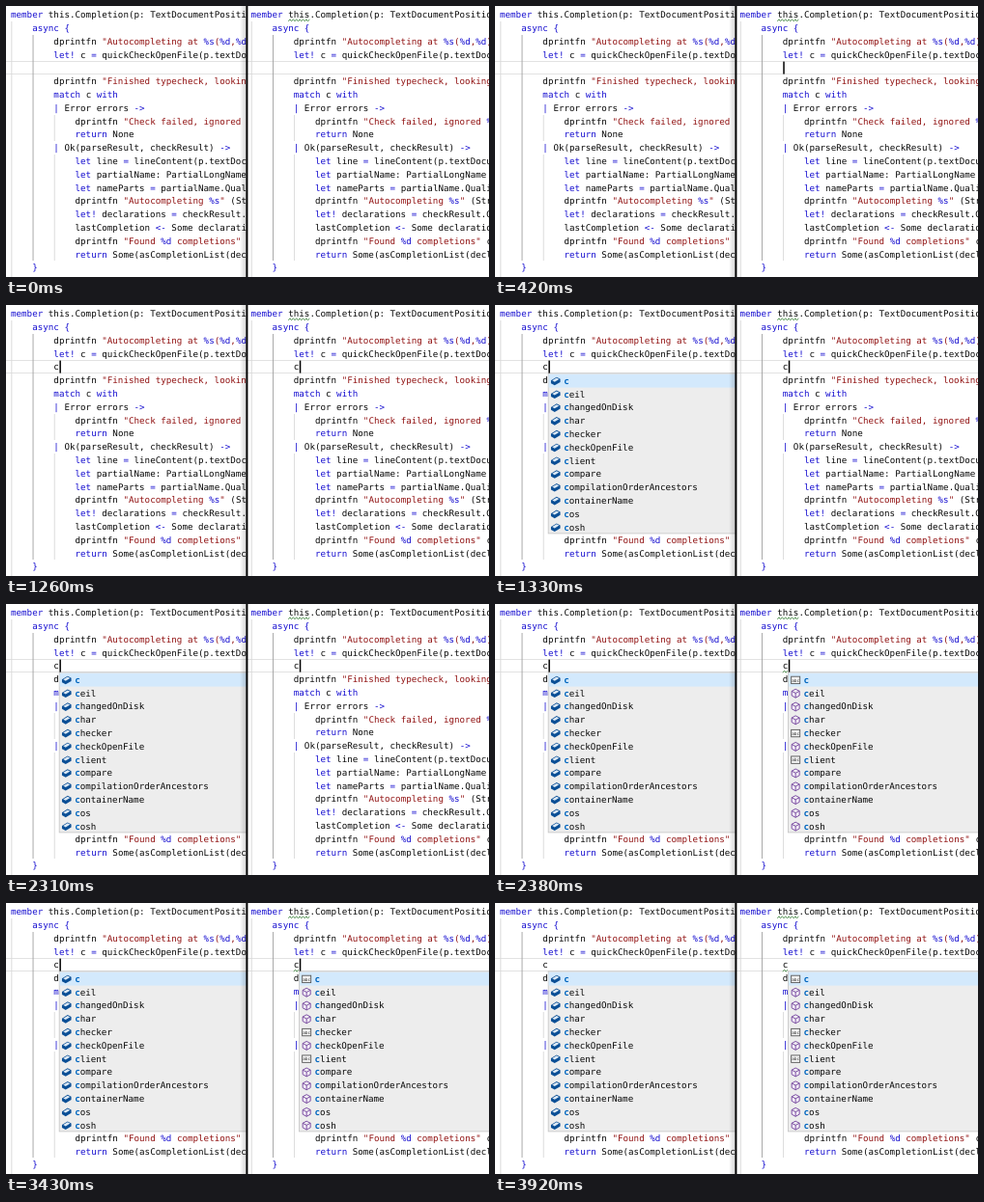
These frames come from a looping animation (500x281 px, 4.2 s). An HTML page:

```html
<!DOCTYPE html>
<html lang="en">
<head>
<meta charset="utf-8">
<title>Code completion side by side</title>
<style>
html, body { margin: 0; width: 100%; height: 100%; overflow: hidden; background: #fff; }
svg { display: block; width: 100vw; height: 100vh; }
text {
  font: 9.21px "DejaVu Sans Mono", monospace;
  white-space: pre;
  text-rendering: geometricPrecision;
}
</style>
</head>
<body>
<svg id="stage" viewBox="0 0 500 281" preserveAspectRatio="none"></svg>
<script>
const LOOP = 4200, CHAR = 5.545, LINE = 13.79, BASE = 12.3;
const BLUE = '#1810d0', RED = '#921414', INK = '#0a0a0a';

const code = [
  'member this.Completion(p: TextDocumentPositionParams) =',
  '    async {',
  '        dprintfn "Autocompleting at %s(%d,%d)" p.textDocument',
  '        let! c = quickCheckOpenFile(p.textDocument)',
  '',
  '        dprintfn "Finished typecheck, looking for completions"',
  '        match c with',
  '        | Error errors ->',
  '            dprintfn "Check failed, ignored %d errors"',
  '            return None',
  '        | Ok(parseResult, checkResult) ->',
  '            let line = lineContent(p.textDocument)',
  '            let partialName: PartialLongName = getName line',
  '            let nameParts = partialName.QualifyingIdents',
  '            dprintfn "Autocompleting %s" (String.concat)',
  '            let! declarations = checkResult.GetDeclarations',
  '            lastCompletion <- Some declarations',
  '            dprintfn "Found %d completions" count',
  '            return Some(asCompletionList(declarations))',
  '    }'
];
const items = ['c', 'ceil', 'changedOnDisk', 'char', 'checker', 'checkOpenFile', 'client',
  'compare', 'compilationOrderAncestors', 'containerName', 'cos', 'cosh'];
const plainWords = ['c', 'checker', 'client'];

const stage = document.getElementById('stage');

function add(parent, tag, attrs, content) {
  const node = document.createElementNS('http://www.w3.org/2000/svg', tag);
  for (const key in attrs) node.setAttribute(key, attrs[key]);
  if (content) node.textContent = content;
  parent.appendChild(node);
  return node;
}

function rect(parent, x, y, width, height, fill) {
  return add(parent, 'rect', { x, y, width, height, fill });
}

function clip(id, x, width) {
  rect(add(stage, 'clipPath', { id }), x, 0, width, 281, '#000');
}

function paintLine(parent, source, x, y) {
  const tokens = /"[^"]*"|\blet!|\b(?:member|async|let|match|with|return)\b|->|<-|[{}|=]|[^\s"]+?(?=[\s"{}|=.]|$)|\.|\s+/g;
  const isKey = /^(?:let!?|member|async|match|with|return|->|<-|[{}|=])$/;
  const put = (str, at, fill) => add(parent, 'text', { x: x + at * CHAR, y, fill }, str);
  for (const m of source.matchAll(tokens)) {
    const word = m[0];
    if (!word.trim()) continue;
    if (word[0] === '"') {
      for (const part of word.matchAll(/%[sd]|[^%]+/g))
        put(part[0], m.index + part.index, part[0][0] === '%' ? BLUE : RED);
    } else put(word, m.index, isKey.test(word) ? BLUE : INK);
  }
}

function squiggle(parent, x, y, width) {
  let d = `M${x} ${y}`;
  for (let i = 1; i * 1.7 <= width; i++) d += `L${x + i * 1.7} ${y + (i % 2 ? -1.6 : 0)}`;
  return add(parent, 'path', { d, fill: 'none', stroke: '#2c7a2c', 'stroke-width': 0.9 });
}

function brick(parent, x, y) {
  const g = add(parent, 'g', { transform: `translate(${x} ${y})` });
  add(g, 'path', { d: 'M-4.8 -.6L1 -4.2L4.8 -2.2V1L-1 4.4L-4.8 2.3Z', fill: '#0b4f96' });
  add(g, 'path', { d: 'M-3.5 -.6L1 -3.3L3.6 -2L-1 .8Z', fill: '#dce9f5' });
}

function cube(parent, x, y) {
  add(parent, 'path', {
    transform: `translate(${x} ${y})`,
    d: 'M0 -4.4L4 -2.3V2.3L0 4.5L-4 2.3V-2.3ZM-4 -2.3L0 -.2L4 -2.3M0 -.2V4.5',
    fill: '#f4edf8', stroke: '#70409a', 'stroke-width': 0.9, 'stroke-linejoin': 'round'
  });
}

function wordBox(parent, x, y) {
  add(parent, 'rect', { x: x - 4.5, y: y - 3.7, width: 9, height: 7.4,
    fill: '#f5f5f5', stroke: '#555', 'stroke-width': 0.9 });
  add(parent, 'text', { x, y: y + 1.7, fill: '#333', 'text-anchor': 'middle',
    style: 'font-size:4.4px' }, 'abc');
}

function popup(parent, x, mixed) {
  const g = add(parent, 'g', {});
  add(g, 'rect', { x: x + 0.4, y: 70.9, width: 220, height: 166,
    fill: '#ededed', stroke: '#c4c4c4', 'stroke-width': 0.8 });
  rect(g, x + 0.8, 71.8, 220, 13.8, '#d3e9fc');
  items.forEach((item, i) => {
    const y = 78.9 + i * LINE;
    const icon = !mixed ? brick : plainWords.includes(item) ? wordBox : cube;
    icon(g, x + 8, y);
    const left = x + 16.4, base = y + 3;
    add(g, 'text', { x: left, y: base, fill: '#0066bf', style: 'font-weight:bold' }, 'c');
    add(g, 'text', { x: left + CHAR, y: base, fill: INK }, item.slice(1));
  });
  return g;
}

function editor(id, x, mixed) {
  const g = add(stage, 'g', { 'clip-path': `url(#${id})` });
  for (const y of [57, 70]) rect(g, x - 5, y, 260, 1, '#e2e2e2');
  const guide = (col, from, to, fill) => rect(g, x + col * CHAR + 0.4, from, 0.9, to - from, fill);
  guide(0, 16, 281, '#d8d8d8');
  guide(4, 30, 264, '#a0a0a0');
  guide(8, 113, 140, '#d8d8d8');
  guide(8, 154, 264, '#d8d8d8');
  code.forEach((source, i) => paintLine(g, source, x, BASE + i * LINE));
  if (mixed) squiggle(g, x + 7 * CHAR, 15.6, 4 * CHAR);

  const at = x + 8 * CHAR;
  const typed = add(g, 'text', { x: at, y: BASE + 4 * LINE, fill: INK }, 'c');
  const warning = mixed ? squiggle(g, at, 71, CHAR) : null;
  const list = popup(g, at + 5.4, mixed);
  const caret = rect(g, at, 57.6, 1.5, 13, '#000');
  return { at, typed, warning, list, caret };
}

clip('leftPane', 0, 249);
clip('rightPane', 250, 250);
const left = editor('leftPane', 5, false);
const right = editor('rightPane', 253.4, true);

// Soft shade beside the divider
const shade = add(stage, 'linearGradient', { id: 'shade' });
add(shade, 'stop', { offset: 0, 'stop-color': '#000', 'stop-opacity': 0 });
add(shade, 'stop', { offset: 1, 'stop-color': '#000', 'stop-opacity': 0.16 });
rect(stage, 242, 0, 6.5, 281, 'url(#shade)');
rect(stage, 248.4, 0, 2, 281, '#000');

const show = (node, on) => node && node.setAttribute('visibility', on ? 'visible' : 'hidden');
const during = (t, spans) => spans.some(([from, to]) => t >= from && t < to);

const TYPED = 1190;
const blinks = [[TYPED, 1680], [2240, 2730], [3290, 3780]];

function update(pane, t, listAt, idle) {
  const typed = t >= TYPED;
  show(pane.typed, typed);
  show(pane.list, t >= listAt);
  show(pane.warning, t >= listAt);
  show(pane.caret, during(t, [idle, ...blinks]));
  pane.caret.setAttribute('x', pane.at + (typed ? CHAR + 0.5 : 0.5));
}

const start = performance.now();
function frame(now) {
  const t = Math.max(0, now - start) % LOOP;
  update(left, t, 1330, [490, 980]);
  update(right, t, 2380, [350, 840]);
  requestAnimationFrame(frame);
}
frame(start);
</script>
</body>
</html>
```
